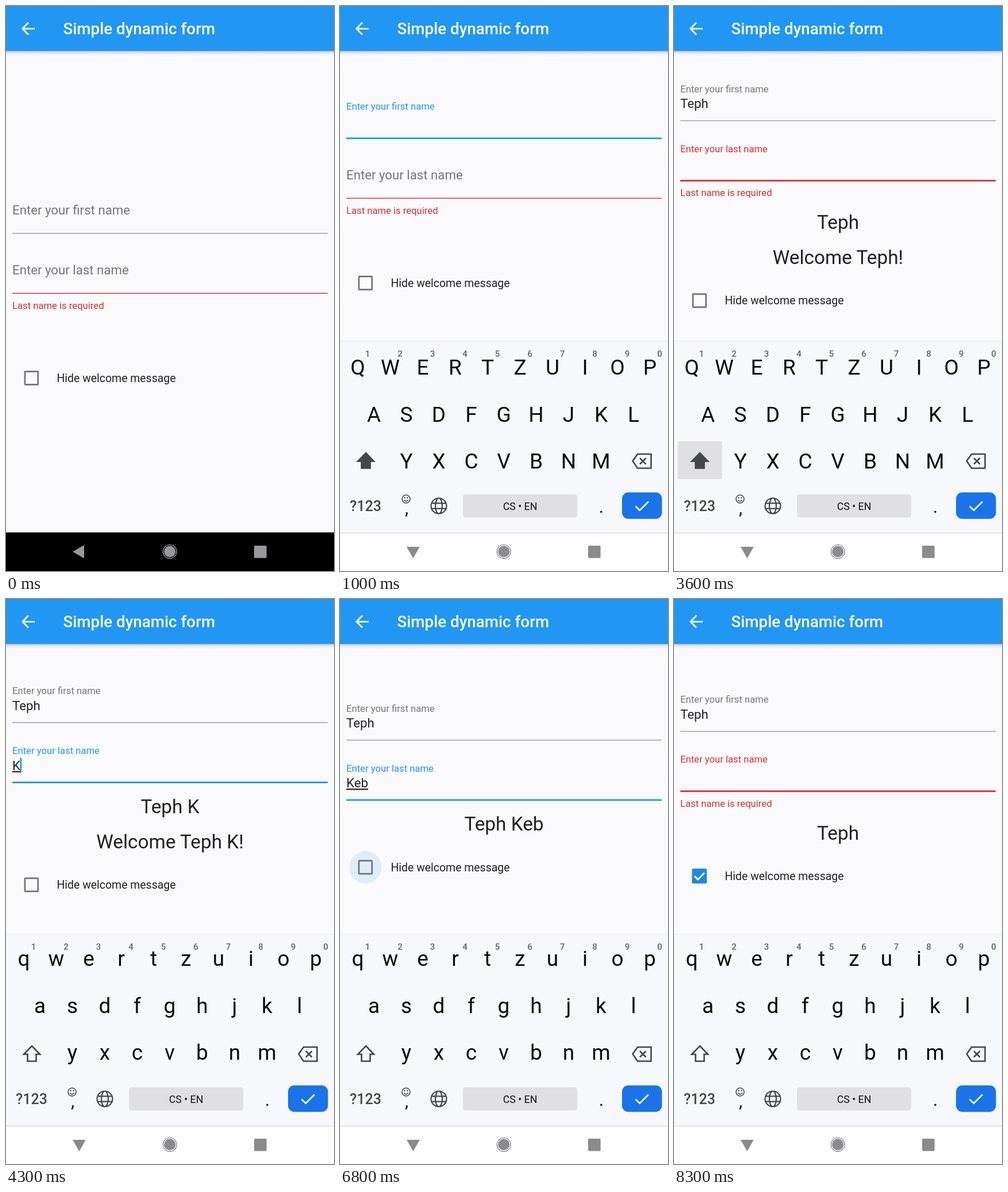
An HTML page that plays this animation: 571x981 px, repeating every 8.7 s.

```html
<!DOCTYPE html>
<html lang="en">
<head>
<meta charset="utf-8">
<title>Simple dynamic form</title>
<style>
  html, body { margin: 0; width: 100%; height: 100%; overflow: hidden; background: #faf9fb; }
  svg { display: block; width: 571px; height: 981px; font-family: Roboto, sans-serif; }
  text { white-space: pre; }
  .mid { text-anchor: middle; }
  .typing { text-decoration: underline; text-decoration-skip-ink: none; }
</style>
</head>
<body>
<svg id="stage" viewBox="0 0 571 981">
  <defs>
    <linearGradient id="shade" x2="0" y2="1">
      <stop stop-color="#000" stop-opacity=".24"/>
      <stop offset=".4" stop-color="#000" stop-opacity=".07"/>
      <stop offset="1" stop-color="#000" stop-opacity="0"/>
    </linearGradient>
  </defs>
  <rect width="571" height="981" fill="#faf9fb"/>
  <g id="form"></g>
  <rect y="78" width="571" height="9" fill="url(#shade)"/>
  <rect width="571" height="78" fill="#2196f3"/>
  <path d="M50 39.3H29M39 28.7L28.8 39.3L39 49.9" fill="none" stroke="#fff" stroke-width="2.8"/>
  <text x="99.5" y="49" font-size="27.78" font-weight="500" fill="#fff">Simple dynamic form</text>
  <g id="keyboard"></g>
  <g id="nav"></g>
</svg>
<script>
const LOOP = 8700, STEP = 100;
const BLUE = '#2196f3', RED = '#d32f2f', GRAY = '#757577', INK = '#212123', ICON = '#444649';
const BODY = 22.22, SMALL = 0.75, BIG = 33.33;

const $ = id => document.getElementById(id);
const clamp = v => Math.max(0, Math.min(1, v));
const ease = v => { v = clamp(v); return v * v * (3 - 2 * v); };

function set(el, attrs) {
  for (const k in attrs) el.setAttribute(k, attrs[k]);
  return el;
}
function add(parent, tag, attrs, text) {
  const el = set(document.createElementNS('http://www.w3.org/2000/svg', tag), attrs);
  if (text) el.textContent = text;
  return parent.appendChild(el);
}
const show = (el, on) => set(el, { visibility: on ? 'visible' : 'hidden' });

// Form
const form = $('form');
function makeField(label) {
  return {
    line: add(form, 'rect', { x: 11, width: 549 }),
    label: add(form, 'text', { y: 7.9, 'font-size': BODY }, label),
    value: add(form, 'text', { x: 11, 'font-size': BODY, fill: INK }),
    caret: add(form, 'rect', { width: 2.6, height: 26, fill: BLUE })
  };
}
const first = makeField('Enter your first name');
const last = makeField('Enter your last name');
const error = add(form, 'text', { x: 11, 'font-size': BODY * SMALL, fill: RED }, 'Last name is required');
const nameLine = add(form, 'text', { x: 285.5, 'font-size': BIG, fill: INK, class: 'mid' });
const welcome = add(form, 'text', { x: 285.5, 'font-size': BIG, fill: INK, class: 'mid' });
const check = add(form, 'g', {});
const ripple = add(check, 'circle', { cx: 44.3, fill: BLUE });
add(check, 'rect', { x: 32.9, y: -11.4, width: 22.8, height: 22.8, rx: 0.8, fill: 'none', stroke: '#737477', 'stroke-width': 2.7 });
const tick = add(check, 'g', {});
add(tick, 'rect', { x: 31.5, y: -12.8, width: 25.6, height: 25.6, rx: 1.6, fill: '#1e88e5' });
add(tick, 'path', { d: 'M35.8 0.3L41.6 6L53 -5.6', fill: 'none', stroke: '#fff', 'stroke-width': 2.8 });
add(check, 'text', { x: 88.5, y: 6.9, 'font-size': 19.44, fill: INK }, 'Hide welcome message');

// Keyboard
const kb = $('keyboard');
add(kb, 'rect', { y: 581, width: 571, height: 3, fill: '#f1f1f4' });
add(kb, 'rect', { y: 583, width: 571, height: 332, fill: '#f6f8fb' });
const shiftDown = add(kb, 'rect', { x: 6.5, y: 756, width: 77, height: 65.5, fill: '#e0dfe2' });
const eraseDown = add(kb, 'rect', { x: 487, y: 756, width: 77, height: 65.5, fill: '#e0dfe2' });
const PITCH = 56.5;
const keys = {};
['qwertzuiop', 'asdfghjkl', 'yxcvbnm'].forEach((row, r) => {
  [...row].forEach((ch, i) => {
    const x = [31, 59, 115.5][r] + PITCH * i, y = 640 + 81.5 * r;
    const el = add(kb, 'text', { x, 'font-size': 37, fill: '#0a0a0b', class: 'mid' });
    keys[ch] = { x, y, el };
    if (!r) add(kb, 'text', { x: x + 17, y: 609, 'font-size': 15, 'font-weight': 500, fill: '#606266', class: 'mid' }, String((i + 1) % 10));
  });
});
const line = (d, w = 2.6) => add(kb, 'path', { d, fill: 'none', stroke: ICON, 'stroke-width': w });
const shift = line('M45 776L59 790.5H52.5V802.5H37.5V790.5H31Z');
line('M509.5 790L518 778H541.5V802.5H518Z');
line('M522 785L532.5 795.5M532.5 785L522 795.5');
add(kb, 'text', { x: 44.5, y: 877, 'font-size': 25, 'font-weight': 500, fill: ICON, class: 'mid' }, '?123');
line('M122 856a7 7 0 1 0 -14 0a7 7 0 1 0 14 0M111.3 857.6Q115 862.5 118.7 857.6', 1.6);
add(kb, 'circle', { cx: 112.6, cy: 853.8, r: 1.2, fill: ICON });
add(kb, 'circle', { cx: 117.4, cy: 853.8, r: 1.2, fill: ICON });
add(kb, 'text', { x: 116, y: 882, 'font-size': 28, 'font-weight': 500, fill: '#202124', class: 'mid' }, ',');
line('M185.5 868a13.5 13.5 0 1 0 -27 0a13.5 13.5 0 1 0 27 0M178 868a6 13.5 0 1 0 -12 0a6 13.5 0 1 0 12 0M160 863.3H184M160 872.7H184', 2.2);
add(kb, 'rect', { x: 214, y: 848, width: 199, height: 40, rx: 4.5, fill: '#e0dfe2' });
add(kb, 'text', { x: 313.5, y: 875, 'font-size': 17.8, fill: '#111', class: 'mid' }, 'CS • EN');
add(kb, 'text', { x: 455, y: 880, 'font-size': 32, fill: '#111', class: 'mid' }, '.');
add(kb, 'rect', { x: 491, y: 844.5, width: 69.5, height: 46, rx: 11, fill: '#1a73e8' });
add(kb, 'path', { d: 'M514.5 868.5L521.8 875.7L537 860.5', fill: 'none', stroke: '#fff', 'stroke-width': 2.7 });
const popup = add(kb, 'g', {});
add(popup, 'rect', { x: -30, y: -116, width: 60, height: 138, rx: 8, fill: '#fff', stroke: '#dcdde0' });
const popupChar = add(popup, 'text', { y: -62, 'font-size': 42, fill: '#0a0a0b', class: 'mid' });

// System bar
const nav = $('nav');
const navBack = add(nav, 'rect', { y: 914, width: 571, height: 67 });
const navEdge = add(nav, 'rect', { y: 914, width: 571, height: 2, fill: '#e6e6e9' });
const navIcons = add(nav, 'g', {});
const arrow = add(navIcons, 'path', {});
add(navIcons, 'circle', { cx: 285.2, cy: 947.3, r: 10 });
const ring = add(navIcons, 'circle', { cx: 285.2, cy: 947.3, r: 11.9, fill: 'none', 'stroke-width': 1.4 });
add(navIcons, 'rect', { x: 432, y: 937, width: 21.6, height: 21.6, rx: 1.5 });

// Timeline
const FOCUS1 = 100, OPEN = 300, JUMP = 500, FOCUS2 = 2700, HIDE = 6800;
const edits = [
  [0, '', ''], [1400, 'T', ''], [1700, 'Te', ''], [2000, 'Tep', ''], [2300, 'Teph', ''],
  [4100, 'Teph', 'K'], [4600, 'Teph', 'Ke'], [5000, 'Teph', 'Keb'],
  [7500, 'Teph', 'Ke'], [7600, 'Teph', 'K'], [7800, 'Teph', '']
];
const presses = [
  [1300, 1400, 'T'], [1600, 1700, 'e'], [1900, 2000, 'p'], [2200, 2300, 'h'],
  [4000, 4100, 'K'], [4500, 4600, 'e'], [4800, 5000, 'b']
];
const within = (t, a, b) => t >= a && t < b;

function drawField(f, top, o) {
  const k = o.float, s = 1 - (1 - SMALL) * k, h = o.focus ? 2.8 : 1.4;
  set(f.label, { transform: `translate(11 ${top + 14.7 * (1 - k)}) scale(${s})`, fill: o.color });
  set(f.line, { y: top + 55.2 - h / 2, height: h, fill: o.line });
  f.value.textContent = o.text;
  set(f.value, { y: top + 33.4, class: o.focus ? 'typing' : '' });
  const w = o.text ? f.value.getComputedTextLength() : 0;
  set(f.caret, { x: 11 + w - 0.4, y: top + 12.5 });
  show(f.caret, o.focus && o.blink);
}

function render(t) {
  const [edited, a, b] = edits.filter(e => e[0] <= t).pop();
  const invalid = !b, hidden = t >= HIDE, greet = a && !hidden;
  const focus = t >= FOCUS2 ? 2 : t >= FOCUS1 ? 1 : 0;
  const since = Math.max(edited, focus === 2 ? FOCUS2 : FOCUS1);
  const blink = Math.floor((t - since) / 500) % 2 === 0;

  // The form stays centred in the space left above the keyboard.
  const top = 189.8 - (invalid ? 15.25 : 0) - (greet ? 30.5 : 0) + (t < JUMP ? 165 : 0);
  const extra = invalid ? 30.5 : 0;
  drawField(first, top, {
    float: ease((t - FOCUS1) / 200), focus: focus === 1, blink, text: a,
    color: focus === 1 ? BLUE : GRAY, line: focus === 1 ? BLUE : '#9b9b9e'
  });
  drawField(last, top + 104, {
    float: ease((t - FOCUS2) / 200), focus: focus === 2, blink, text: b,
    color: focus < 2 ? GRAY : invalid ? RED : BLUE, line: invalid ? RED : BLUE
  });
  set(error, { y: top + 186, opacity: !invalid ? 0 : t < 7800 ? 1 : clamp((t - 7800) / 200) });
  const full = [a, b].filter(Boolean).join(' ');
  nameLine.textContent = full;
  set(nameLine, { y: top + 212.5 + extra });
  welcome.textContent = greet ? `Welcome ${full}!` : '';
  set(welcome, { y: top + 273.5 + extra });
  set(check, { transform: `translate(0 ${top + 276 + extra + (greet ? 61 : 0)})` });
  set(ripple, {
    r: t < 6700 ? 0 : 14 + 14 * clamp((t - 6700) / 100),
    opacity: 0.13 * (1 - clamp((t - 6800) / 200))
  });
  set(tick, { opacity: clamp((t - HIDE) / 200) });

  const upper = within(t, 800, 1400) || within(t, 3600, 4100);
  for (const ch in keys) {
    const { y, el } = keys[ch];
    el.textContent = upper ? ch.toUpperCase() : ch;
    set(el, { y: upper ? y : y - 3 });
  }
  set(shift, { fill: upper ? ICON : 'none' });
  show(shiftDown, within(t, 800, 900) || within(t, 3600, 3800));
  show(eraseDown, within(t, 7200, 7900));
  const press = presses.find(p => within(t, p[0], p[1]));
  show(popup, !!press);
  if (press) {
    const key = keys[press[2].toLowerCase()];
    popupChar.textContent = press[2];
    set(popup, { transform: `translate(${key.x} ${key.y})` });
  }

  const open = t >= OPEN;
  set(kb, { transform: `translate(0 ${335 * (1 - ease((t - OPEN + 100) / 300))})` });
  kb.style.display = open ? '' : 'none';
  const tone = open ? '#8b8b8e' : '#98989a';
  set(navBack, { fill: open ? '#fefeff' : '#000' });
  show(navEdge, open);
  set(navIcons, { fill: tone });
  set(ring, { stroke: tone });
  set(arrow, { d: open ? 'M116 939H138.8L127.4 959Z' : 'M116 947.5L136 936V959Z' });
}

const start = performance.now();
function tick10() {
  const t = (performance.now() - start) % LOOP;
  render(Math.floor(t / STEP) * STEP);
  requestAnimationFrame(tick10);
}
tick10();
</script>
</body>
</html>
```
